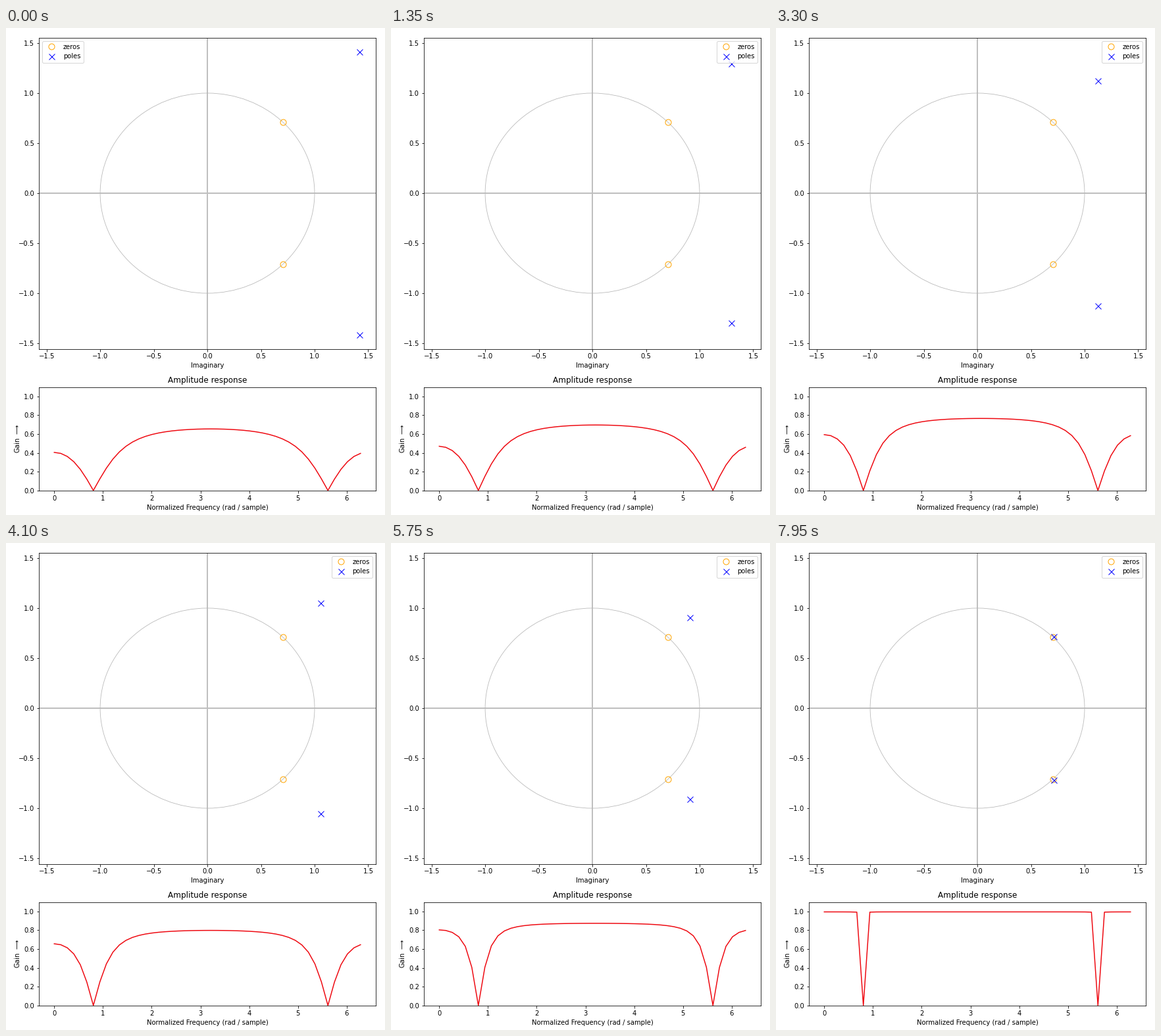
A matplotlib script that plays this animation: 576x740 px, repeating every 8 s.

```python
import numpy as np
import matplotlib.pyplot as plt
from matplotlib.animation import FuncAnimation

W, H = 576, 740
FRAMES, INTERVAL = 160, 50
SAMPLES = 48
ANGLE = np.pi / 4
LEGEND_EDGE = 1.306  # pole height at which the upper right corner is free

plt.rcParams.update({"font.family": "DejaVu Sans", "font.size": 10})
fig = plt.figure(figsize=(W / 72, H / 72), dpi=72, facecolor="white")


def add_axes(left, top, right, bottom):
    """Axes from pixel edges measured from the top left corner."""
    return fig.add_axes([left / W, 1 - bottom / H,
                         (right - left) / W, (bottom - top) / H])


def pair(radius):
    """Coordinates of a conjugate pair on the notch angle."""
    x, y = radius * np.cos(ANGLE), radius * np.sin(ANGLE)
    return [x, x], [y, -y]


def gain(radius):
    """Amplitude of the notch filter around the unit circle."""
    z = np.exp(2j * np.pi * np.arange(SAMPLES) / SAMPLES)
    root = np.exp(1j * ANGLE)
    num = (z - root) * (z - root.conj())
    den = (z - radius * root) * (z - radius * root.conj())
    return np.abs(num / den) * (1 + radius) / 2


# Pole-zero plane
plane = add_axes(50.05, 14.5, 562.05, 487.5)
plane.set(xlim=(-1.571, 1.571), ylim=(-1.5556, 1.5556), xlabel="Imaginary")
ticks = np.arange(-1.5, 1.6, 0.5)
plane.set_xticks(ticks)
plane.set_yticks(ticks)
plane.axhline(0, color="0.75", lw=2, zorder=1)
plane.axvline(0, color="0.75", lw=2, zorder=1)
plane.add_patch(plt.Circle((0, 0), 1, fill=False, ec="0.72", lw=0.8, zorder=1))
plane.plot(*pair(1), "o", ms=9, mfc="none", mec="orange", mew=1, label="zeros")
poles, = plane.plot(*pair(2), "x", ms=9, color="blue", mew=1, label="poles")
legend = plane.legend(loc="upper left")

# Amplitude response
response = add_axes(50.05, 545.5, 562.05, 702.7)
omega = np.linspace(0, 2 * np.pi, SAMPLES)
curve, = response.plot(omega, gain(2), color="#ee0810", lw=1.5)
response.set(xlim=(-0.1 * np.pi, 2.1 * np.pi), ylim=(0, 1.1),
             title="Amplitude response",
             xlabel="Normalized Frequency (rad / sample)",
             ylabel=r"Gain $\longrightarrow$")
response.set_yticks(np.arange(0, 1.1, 0.2))


def update(i):
    radius = 2 - 0.99 * i / (FRAMES - 1)
    x, y = pair(radius)
    poles.set_data(x, y)
    curve.set_ydata(gain(radius))
    legend.set_loc("upper left" if y[0] > LEGEND_EDGE else "upper right")
    return poles, curve, legend


anim = FuncAnimation(fig, update, frames=FRAMES, interval=INTERVAL,
                     repeat=True, repeat_delay=0)
plt.show()
```
